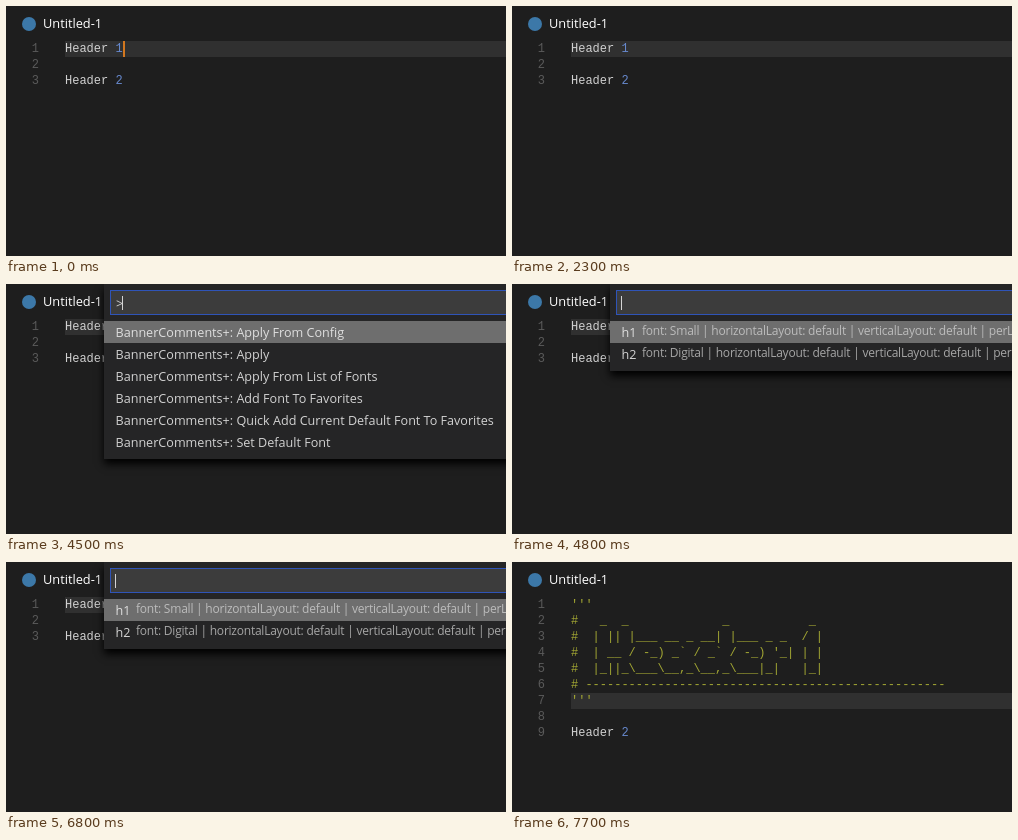
An HTML page for the animation above (8 s loop, 500x250 px).

```html
<!DOCTYPE html>
<html lang="en">
<head>
<meta charset="utf-8">
<title>Banner comments in an editor</title>
<style>
  html, body { margin: 0; width: 100%; height: 100%; overflow: hidden; background: #1e1e1e; }
  #stage {
    position: relative; width: 500px; height: 250px; overflow: hidden;
    background: #1e1e1e; color: #d2d2d2;
    font: 12.6px/22px "Open Sans", "Noto Sans", sans-serif;
  }
  #stage div { position: absolute; white-space: pre; }
  #icon { left: 16px; top: 11px; width: 14px; height: 14px; border-radius: 50%; background: #3c78a8; }
  #title { left: 37px; top: 6px; font-size: 12.8px; font-weight: 500; color: #fff; }

  .code { font: 12px/16px "Liberation Mono", monospace; top: 35px; }
  #gutter { left: 0; width: 33px; text-align: right; color: #5a5a5a; }
  #text { left: 59px; color: #d0d0d0; }
  #text .num { color: #6688cc; }
  #text .str { color: #a2a633; }
  #line { left: 59px; right: 0; height: 16px; background: #303030; }
  #caret { width: 2px; height: 16px; background: #d2771f; }

  #palette { left: 98px; top: 0; width: 420px; background: #252526; box-shadow: 0 5px 8px #000; }
  #input { left: 6px; top: 6px; width: 420px; height: 23px; border: 1px solid #2f54b8; background: #3c3c3c; }
  #prompt { left: 12px; top: 9px; }
  #inputCaret { top: 12px; width: 1px; height: 14px; background: #d4d4d4; }
  #rows { left: 0; top: 37px; width: 100%; }
  #stage .row {
    left: 0; width: 100%; height: 22px; line-height: 24px;
    padding-left: 11.5px; box-sizing: border-box;
  }
  #stage .row:first-child { background: #6e6e6e; color: #dedede; }
  .detail {
    position: absolute; left: 32px; top: -2px;
    font-size: 12px; letter-spacing: -0.23px; color: #a6a6a6;
  }
  .row:first-child .detail { color: #bcbcbc; }
</style>
</head>
<body>
<div id="stage">
  <div id="icon"></div>
  <div id="title">Untitled-1</div>
  <div id="line"></div>
  <div id="gutter" class="code"></div>
  <div id="text" class="code"></div>
  <div id="caret"></div>
  <div id="palette">
    <div id="input"></div>
    <div id="prompt"></div>
    <div id="inputCaret"></div>
    <div id="rows"></div>
  </div>
</div>
<script>
const LOOP = 8000, LINE = 16, ROW = 22, TOP = 35;
const $ = id => document.getElementById(id);

const span = (cls, s) => `<span class="${cls}">${s}</span>`;
const header = n => "Header " + span("num", n);

const banner = [
  "'''",
  "#   _  _             _           _",
  "#  | || |___ __ _ __| |___ _ _  / |",
  "#  | __ / -_) _` / _` / -_) '_| | |",
  "#  |_||_\\___\\__,_\\__,_\\___|_|   |_|",
  "# " + "-".repeat(50),
  "'''"
].join("\n");

const plainDoc = { html: [header(1), "", header(2)].join("\n"), lines: 3, active: 0, caretX: 117 };
const bannerDoc = { html: [span("str", banner), "", header(2)].join("\n"), lines: 9, active: 6, caretX: 81 };

const commands = [
  "Apply From Config", "Apply", "Apply From List of Fonts", "Add Font To Favorites",
  "Quick Add Current Default Font To Favorites", "Set Default Font"
].map(s => "BannerComments+: " + s);

const style = (name, font) => name + span("detail",
  `font: ${font} | horizontalLayout: default | verticalLayout: default | perLine: true`);

const commandList = { prompt: ">", caretX: 116, rows: commands };
const styleList = { prompt: "", caretX: 109, rows: [style("h1", "Small"), style("h2", "Digital")] };

// blink: time until the caret first goes out, then it toggles every 500 ms
const scenes = [
  { at: 0, doc: plainDoc, blink: 300 },
  { at: 2500, doc: plainDoc, list: commandList, blink: 500 },
  { at: 4800, doc: plainDoc, list: styleList, blink: 500 },
  { at: 7200, doc: plainDoc, blink: 500 },
  { at: 7300, doc: bannerDoc, blink: 400 }
];

function showDoc(doc) {
  $("text").innerHTML = doc.html;
  $("gutter").textContent = Array.from({ length: doc.lines }, (_, i) => i + 1).join("\n");
  const y = TOP + doc.active * LINE + "px";
  $("line").style.top = $("caret").style.top = y;
  $("caret").style.left = doc.caretX + "px";
}

function showList(list) {
  $("palette").style.display = list ? "block" : "none";
  if (!list) return;
  $("palette").style.height = 43 + list.rows.length * ROW + "px";
  $("prompt").textContent = list.prompt;
  $("inputCaret").style.left = list.caretX - 98 + "px";
  $("rows").innerHTML = list.rows
    .map((s, i) => `<div class="row" style="top:${i * ROW}px">${s}</div>`).join("");
}

let current;
const start = performance.now();

function draw() {
  const t = (performance.now() - start) % LOOP;
  const scene = scenes.findLast(s => s.at <= t);
  if (scene !== current) {
    current = scene;
    showDoc(scene.doc);
    showList(scene.list);
  }
  const past = t - scene.at - scene.blink;
  const lit = past < 0 || Math.floor(past / 500) % 2 === 1;
  $("caret").style.visibility = lit && !scene.list ? "visible" : "hidden";
  $("inputCaret").style.visibility = lit && scene.list ? "visible" : "hidden";
  requestAnimationFrame(draw);
}
draw();
</script>
</body>
</html>
```
